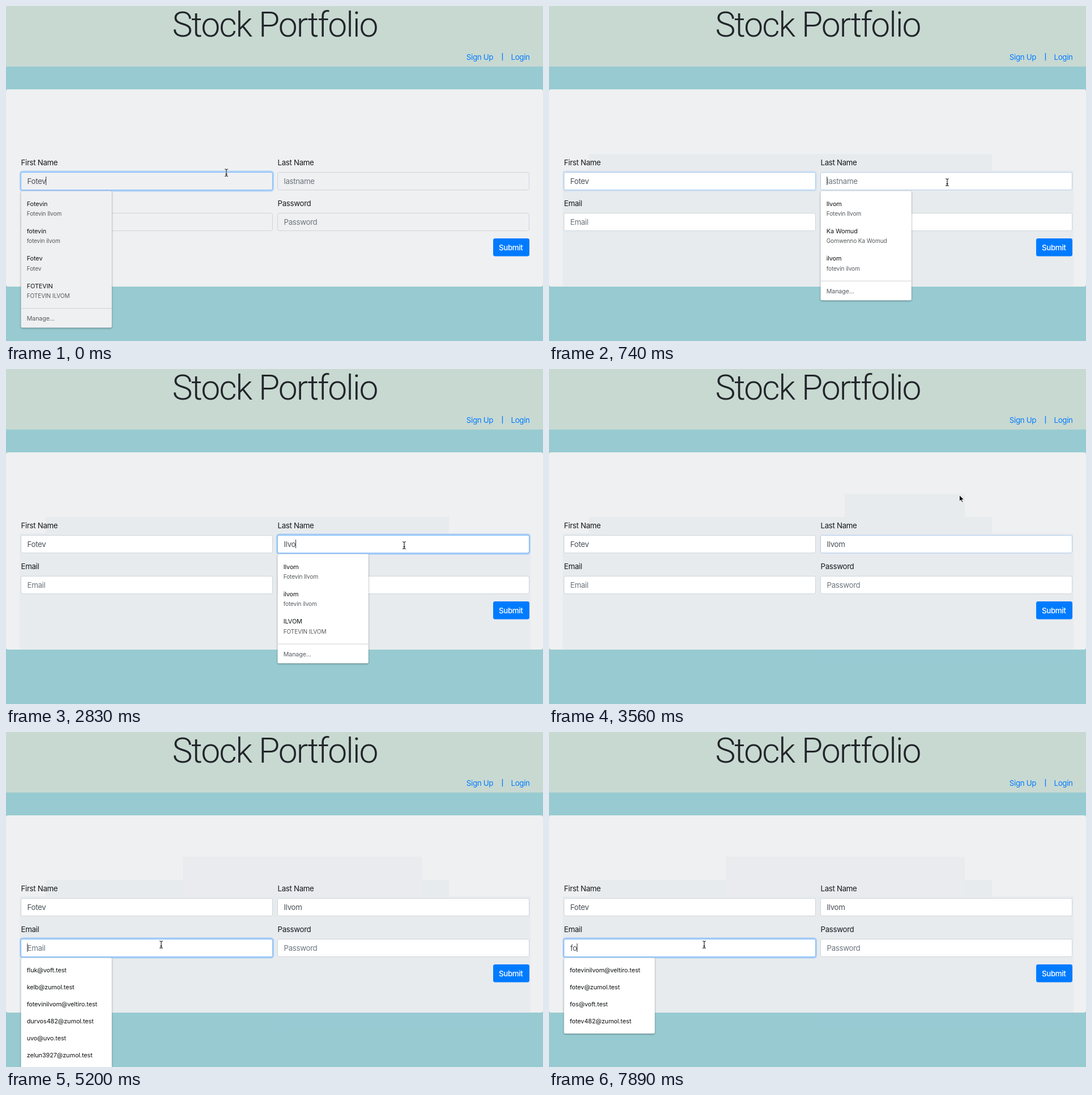
These frames come from a looping animation (948x591 px, 8000 ms). An HTML page:

```html
<!DOCTYPE html>
<html lang="en">
<head>
<meta charset="utf-8">
<title>Sign up form</title>
<style>
  html, body { margin: 0; width: 100%; height: 100%; overflow: hidden; background: #97cbd1; }
  svg { display: block; width: 100%; height: 100%; }
  text { font: 13.3px Inter, "Open Sans", sans-serif; letter-spacing: -.33px; fill: #16191d; white-space: pre; }
  .title { font: 350 60.5px Roboto, Inter, sans-serif; letter-spacing: -1.95px; text-anchor: middle; fill: #212529; }
  .link { fill: #007bff; }
  .bar { fill: #007bff; font-size: 11px; font-weight: 600; }
  .button { fill: #fff; font-weight: 500; }
  .value { fill: #495057; }
  .hint { fill: #6c757d; }
  .item { font-size: 10.9px; letter-spacing: -.1px; fill: #101214; }
  .sub { font-size: 10.1px; letter-spacing: -.12px; fill: #565a5e; }
  .manage { font-size: 10.7px; letter-spacing: -.1px; fill: #565a5e; }
  .menu { filter: drop-shadow(0 1px 1.5px rgba(0, 0, 0, .4)); }
</style>
</head>
<body>
<svg id="stage" viewBox="0 0 948 591" xmlns="http://www.w3.org/2000/svg"></svg>
<script>
const LOOP = 8000;
const stage = document.getElementById('stage');

const fields = [
  { key: 'first', label: 'First Name', hint: 'firstname', x: 26.5, y: 293 },
  { key: 'last', label: 'Last Name', hint: 'lastname', x: 479.5, y: 293 },
  { key: 'email', label: 'Email', hint: 'Email', x: 26.5, y: 365 },
  { key: 'pass', label: 'Password', hint: 'Password', x: 479.5, y: 365 }
];

const full = 'Fotevin Ilvom', lower = full.toLowerCase(), upper = full.toUpperCase();
const mails = {
  fluk: 'fluk@voft.test', kelb: 'kelb@zumol.test', long: 'fotevinilvom@veltiro.test',
  durvos: 'durvos482@zumol.test', uvo: 'uvo@uvo.test', zelun: 'zelun3927@zumol.test',
  fotev: 'fotev@zumol.test', fos: 'fos@voft.test', num: 'fotev482@zumol.test'
};
const pick = names => names.split(' ').map(n => [mails[n]]);

const menus = {
  first: [['Fotevin', full], ['fotevin', lower], ['Fotev', 'Fotev'], ['FOTEVIN', upper]],
  last: [['Ilvom', full], ['Ka Womud', 'Gomwenno Ka Womud'], ['ilvom', lower]],
  lastTyped: [['Ilvom', full], ['ilvom', lower], ['ILVOM', upper]],
  email: pick('fluk kelb long durvos uvo zelun'),
  emailF: pick('fluk long fotev fos num'),
  emailFo: pick('long fotev fos num')
};

// Each step changes part of the state; cursor is [x, y, isArrow].
const steps = [
  [0, { cursor: [389, 294], first: 'Fotev', last: '', email: '', focus: [1, 0, 0], menu: 'first', caret: 0, white: 0, trail: 0 }],
  [150, { cursor: [452, 282, 1], white: 1 }],
  [300, { cursor: [596, 268, 1] }],
  [450, { cursor: [768, 270, 1] }],
  [590, { cursor: [712, 308] }],
  [740, { cursor: [703, 311], focus: [.55, .35, 0], menu: 'last', caret: 1 }],
  [890, { focus: [0, 1, 0] }],
  [1190, { caret: -1 }],
  [1790, { caret: 1 }],
  [2240, { last: 'I', menu: 'lastTyped' }],
  [2530, { last: 'Il' }],
  [2680, { last: 'Ilv' }],
  [2830, { last: 'Ilvo' }],
  [2970, { last: 'Ilvom' }],
  [3270, { cursor: [716, 262, 1] }],
  [3420, { cursor: [724.5, 222.5, 1] }],
  [3560, { focus: [0, .4, 0], menu: '', caret: -1, trail: 1 }],
  [3710, { cursor: [660, 228, 1], focus: [0, 0, 0] }],
  [3860, { cursor: [490, 252, 1], trail: 2 }],
  [4000, { cursor: [345, 300] }],
  [4150, { cursor: [290, 352, 1] }],
  [4300, { cursor: [274, 373] }],
  [4450, { cursor: [274, 375] }],
  [5200, { focus: [0, 0, 1], menu: 'email', caret: 2 }],
  [5650, { caret: -1 }],
  [6100, { caret: 2 }],
  [6550, { caret: -1 }],
  [7150, { caret: 2 }],
  [7600, { email: 'f' }],
  [7750, { menu: 'emailF' }],
  [7890, { email: 'fo', menu: 'emailFo' }]
];

let last = {};
const states = steps.map(([at, change]) => last = { ...last, ...change, at });

const rect = (x, y, w, h, fill, more = '') =>
  `<rect x="${x}" y="${y}" width="${w}" height="${h}" fill="${fill}" ${more}/>`;
const text = (x, y, str, cls = '', id = '') =>
  `<text x="${x}" y="${y}" class="${cls}"${id && ` id="${id}"`}>${str}</text>`;
const mix = (a, b, k) => `rgb(${a.map((v, i) => Math.round(v + (b[i] - v) * k))})`;

function drawTrail(s) {
  if (!s.white) return '';
  let out = rect(70, 261, 712, 29, '#e8ebee') + rect(24, 290, 902, 204, '#e7ebee');
  if (s.trail) out += rect(477, 495, 449, 28, '#98cad4');
  if (s.trail === 1) out += rect(522, 220, 212, 41, '#e7ebee');
  if (s.trail === 2) out += rect(312, 220, 422, 70, '#e9ebef');
  return out;
}

function drawField(f, i, s) {
  const k = s.focus[i] || 0, value = s[f.key];
  const glow = Math.max(0, k * 1.6 - .6);
  const halo = glow
    ? rect(f.x - 2.5, f.y - 2.5, 449, 37, '#007bff', `rx="5.5" fill-opacity="${.27 * glow}"`) : '';
  const border = mix([206, 212, 218], [128, 189, 255], k);
  return text(f.x, f.y - 12, f.label) + halo +
    rect(f.x, f.y + .5, 444, 31, s.white ? '#fff' : '#eff0f2', `rx="3" stroke="${border}"`) +
    text(f.x + 11, f.y + 20.8, value || f.hint, value ? 'value' : 'hint', f.key);
}

function drawMenu(s) {
  if (!s.menu) return '';
  const list = menus[s.menu], fill = s.white ? '#fff' : '#eff0f2';
  const f = fields.find(f => s.menu.startsWith(f.key)), x = f.x, top = f.y + 33.5;
  const box = h => rect(x, top, 160.3, h, fill, 'rx="2.5" class="menu"');
  if (f.key === 'email') {
    const h = list.length > 5 ? 230 : list.length * 30 + 13.5;
    return box(h) + list.map(([a], i) => text(x + 10.2, 424 + i * 30, a, 'item')).join('');
  }
  const line = 340 + list.length * 48.4;
  return box(line + 34 - top) +
    list.map(([a, b], i) => text(x + 10.2, 352.6 + i * 48.4, a, 'item') +
      text(x + 10.2, 369.8 + i * 48.4, b, 'sub')).join('') +
    rect(x, line - .5, 160.3, 1, '#cfd2d5') + text(x + 10.2, line + 21.4, 'Manage...', 'manage');
}

function drawCursor([x, y, arrow]) {
  const shape = arrow
    ? '<path d="M0 0v11l2.6-2.4 1.8 4.1 1.9-.8-1.8-4h3.6z" fill="#000" stroke="#fff" stroke-width=".9"/>'
    : ['#fff" stroke-opacity=".7" stroke-width="2.4', '#111" stroke-width="1.1'].map(look =>
      `<path d="M-3-6.3Q-.4-6.3 0-5Q.4-6.3 3-6.3M0-5V5M-3 6.3Q-.4 6.3 0 5Q.4 6.3 3 6.3M-1.6 2.6H1.6" fill="none" stroke="${look}"/>`).join('');
  return `<g transform="translate(${x} ${y})">${shape}</g>`;
}

function drawCaret(s) {
  const f = fields[s.caret];
  if (!f) return;
  const width = s[f.key] ? document.getElementById(f.key).getComputedTextLength() : 0;
  const mark = document.getElementById('caret');
  mark.setAttribute('x', f.x + 10.8 + width);
  mark.setAttribute('y', f.y + 8);
  mark.setAttribute('height', 15);
}

function draw(s) {
  stage.innerHTML =
    rect(0, 0, 948, 591, '#97cbd1') +
    rect(0, 0, 948, 107, '#c8d9d2') + rect(0, 106, 948, 1, '#c0d4ce') +
    text(474.5, 54, 'Stock Portfolio', 'title') +
    text(812.8, 95.2, 'Sign Up', 'link') + text(874.4, 94.4, '|', 'bar') + text(891.5, 95.2, 'Login', 'link') +
    rect(0, 147, 948, 348, '#eff0f2', 'rx="4"') +
    drawTrail(s) +
    fields.map((f, i) => drawField(f, i, s)).join('') +
    rect(860, 410, 64, 31.5, '#007bff', 'rx="3.4"') + text(870, 430.7, 'Submit', 'button') +
    drawMenu(s) + rect(0, 0, 1, 0, '#333', 'id="caret"') + drawCursor(s.cursor);
  drawCaret(s);
}

let shown;
function tick(now) {
  const t = now % LOOP;
  const state = states.filter(s => s.at <= t).pop() || states[0];
  if (state !== shown) draw(shown = state);
  requestAnimationFrame(tick);
}
draw(shown = states[0]);
requestAnimationFrame(tick);
</script>
</body>
</html>
```
